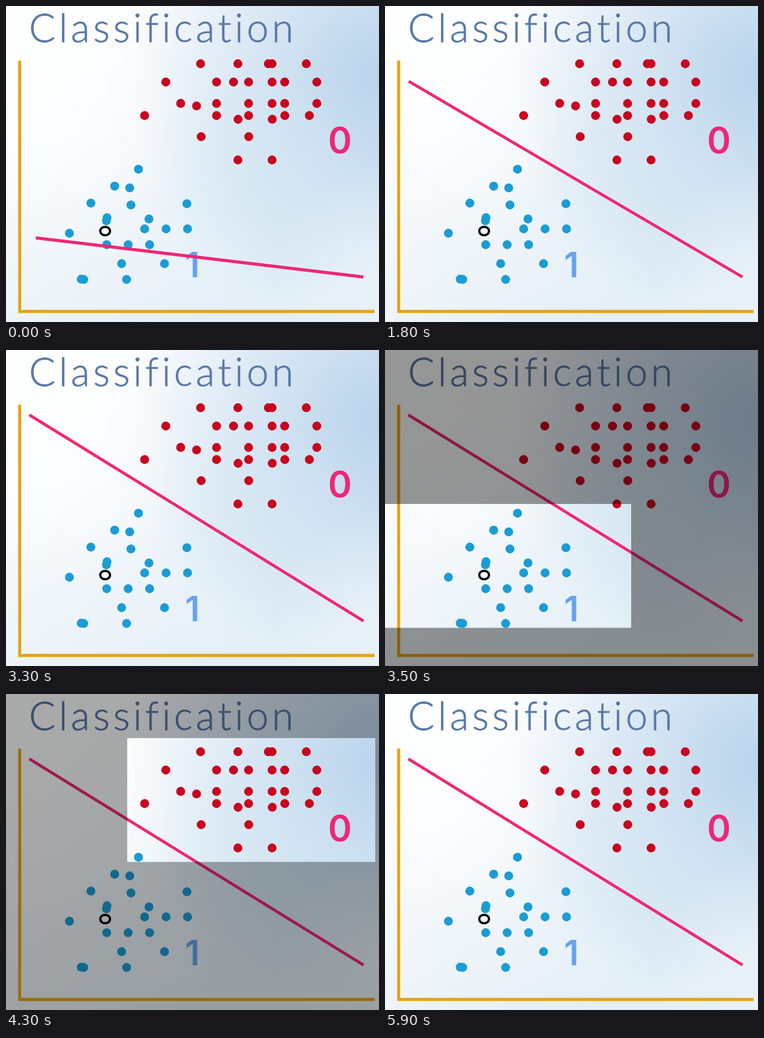
These frames come from a looping animation (600 by 509 pixels, 6 s). An HTML page with a canvas:

```html
<!DOCTYPE html>
<html lang="en">
<head>
<meta charset="utf-8">
<title>Classification</title>
<style>
  html, body { margin: 0; width: 100%; height: 100%; overflow: hidden; }
  canvas { display: block; }
</style>
</head>
<body>
<canvas id="stage" width="600" height="509"></canvas>
<script>
const W = 600, H = 509, LOOP = 6000, STEP = 100;
const ctx = document.getElementById('stage').getContext('2d');
const PINK = '#ee2777', RED = '#c8041e', BLUE = '#1b9cd5', ORANGE = '#e8a10e';

const progress = (t, from, to) => Math.min(1, Math.max(0, (t - from) / (to - from)));
const ease = u => (1 - Math.cos(Math.PI * u)) / 2;
const mix = (a, b, u) => a + (b - a) * u;

function fillStage(gradient, ...colors) {
  colors.forEach((color, i) => gradient.addColorStop(i / (colors.length - 1), color));
  ctx.fillStyle = gradient;
  ctx.fillRect(0, 0, W, H);
}

function glow(x, y, radius, rgb, alpha) {
  fillStage(ctx.createRadialGradient(x, y, 0, x, y, radius),
    `rgba(${rgb},${alpha})`, `rgba(${rgb},${alpha * 0.5})`, `rgba(${rgb},0)`);
}

function background() {
  fillStage(ctx.createLinearGradient(60, 100, 330, 500), '#fdfefe', '#f1f6fa', '#e4eff6');
  glow(600, 110, 400, '181,208,234', 0.9);
  glow(410, 290, 190, '208,230,241', 0.45);
  glow(600, 430, 170, '240,246,250', 0.6);
  glow(90, 190, 200, '255,255,255', 0.5);
}

function line(color, width, ...points) {
  ctx.strokeStyle = color;
  ctx.lineWidth = width;
  ctx.beginPath();
  points.forEach(([x, y]) => ctx.lineTo(x, y));
  ctx.stroke();
}

// Evenly spaced dots in the current fill colour.
function dots(x, y, count = 1, dx = 0, dy = 0) {
  for (let i = 0; i < count; i++) {
    ctx.beginPath();
    ctx.arc(x + i * dx, y + i * dy, 7.2, 0, Math.PI * 2);
    ctx.fill();
  }
}

function redCluster() {
  const rows = [122.5, 157, 176.5], gap = 55;
  ctx.fillStyle = RED;
  rows.forEach(y => dots(338.7, y, 2, 51.5));
  rows.slice(0, 2).forEach(y => dots(428, y, 2, 20.3));
  dots(448.5, rows[2], 2, 39.5);
  dots(500, rows[0], 2, 0, 34.5);
  dots(257, rows[0], 2, 24, 34.3);
  dots(373, 93, 3, gap);
  dots(373.3, 182.5, 2, gap);
  dots(373, 248, 2, gap);
  dots(314, 210.5, 2, 76.5);
  dots(313, 93);
  dots(422, 93);
  dots(366, rows[0]);
  dots(306.5, 161);
  dots(223, rows[2]);
}

function blueCluster() {
  const gap = 34.5;
  ctx.fillStyle = BLUE;
  dots(136.5, 317.5, 3, 38.3, -27.3);
  dots(199, 293, 2, 2, 27.5);
  dots(162.5, 341, 2, -1, 5);
  dots(223, 359, 3, gap);
  dots(162, 384.5, 3, gap);
  dots(186, 415, 2, 2 * gap);
  dots(125, 440.5, 2, 2 * gap);
  dots(121, 440);
  dots(291, 318.5);
  dots(230, 343);
  dots(102, 366);
}

function label(text, x, y, font, color, spacing = 0, outline = 0) {
  ctx.font = font;
  ctx.letterSpacing = spacing + 'px';
  ctx.fillStyle = ctx.strokeStyle = color;
  ctx.fillText(text, x, y);
  if (outline) {
    ctx.lineWidth = outline;
    ctx.strokeText(text, x, y);
  }
}

function ring() {
  ctx.fillStyle = '#f2f8fb';
  ctx.strokeStyle = '#000';
  ctx.lineWidth = 3.6;
  ctx.beginPath();
  ctx.ellipse(159.5, 362.5, 7.9, 6.8, 0, 0, Math.PI * 2);
  ctx.fill();
  ctx.stroke();
}

// Dims the stage except for a window that travels from one class to the other.
function spotlight(t) {
  const alpha = 0.82 * progress(t, 3300, 3700) * (1 - progress(t, 4000, 4510));
  if (!alpha) return;
  const u = ease(progress(t, 3500, 4300));
  ctx.fillStyle = `rgba(0,0,0,${alpha})`;
  ctx.beginPath();
  ctx.rect(0, 0, W, H);
  ctx.rect(mix(-3, 195, u), mix(248, 71, u), 399, 199.5);
  ctx.fill('evenodd');
}

function draw(t) {
  background();
  label('Classification', 37, 58, '300 63px Lato, sans-serif', '#5878a6', 5.4, 0.8);
  line(ORANGE, 4.8, [22, 88], [22, 492], [593, 492]);
  redCluster();
  blueCluster();
  ring();
  label('0', 518, 237, '600 58px Inter, sans-serif', PINK);
  label('1', 288, 437, '600 56px Inter, sans-serif', '#66a3ef');

  const u = ease(progress(t, 180, 2110));
  line(PINK, 4.8, [mix(48, 37.5, u), mix(373.5, 104.5, u)], [575, 436.5]);
  spotlight(t);
}

function tick(now) {
  draw(Math.floor(now % LOOP / STEP) * STEP);
  requestAnimationFrame(tick);
}
draw(0);
requestAnimationFrame(tick);
</script>
</body>
</html>
```
